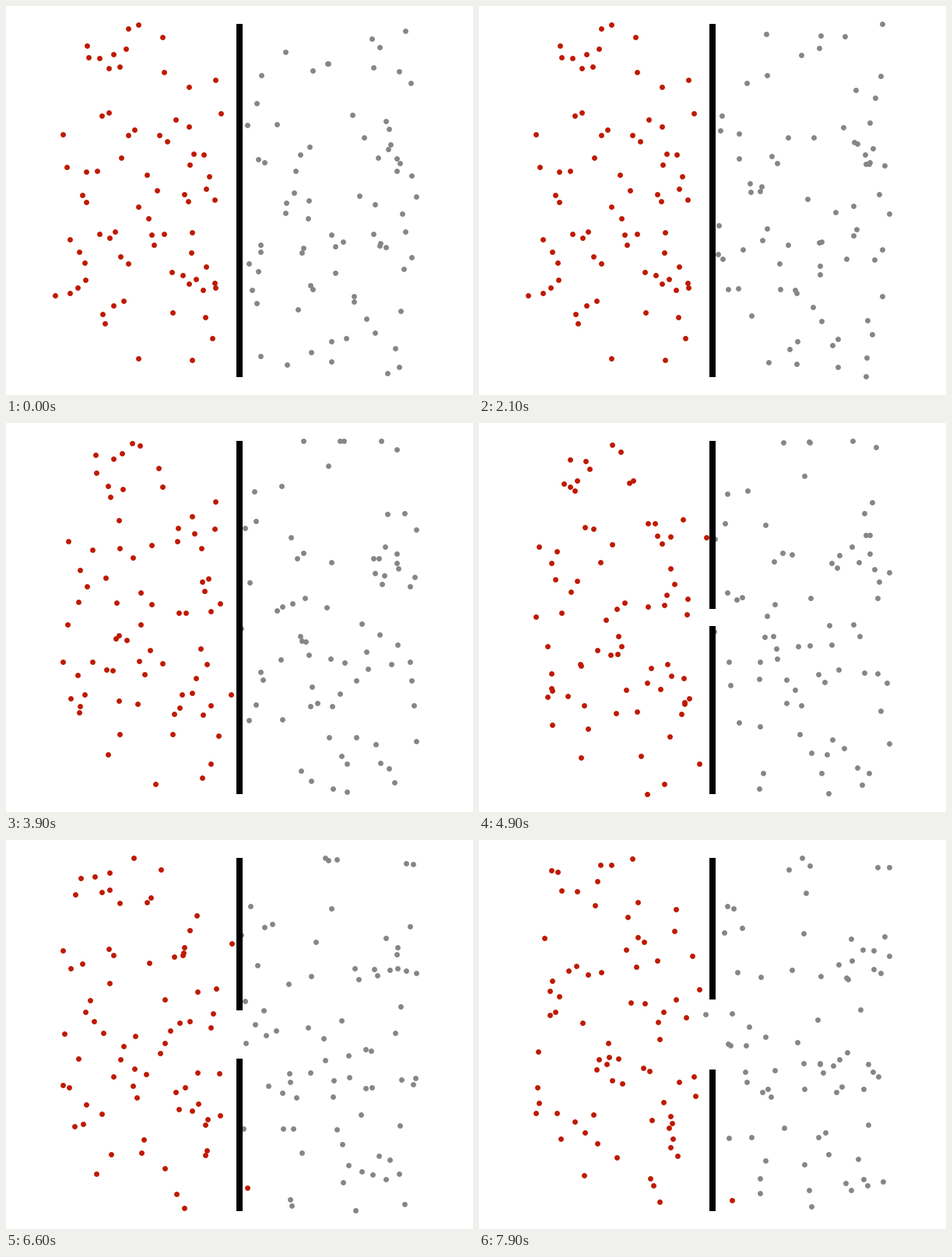
Animation, 600 px wide and 500 px high, one loop 8 s. Source, as a matplotlib script:

```python
import numpy as np
import matplotlib.pyplot as plt
from matplotlib.animation import FuncAnimation
from matplotlib.patches import Rectangle

W, H = 600, 500
FRAMES = 80
UNIT = 500 / 110            # pixels per unit of the 100 x 100 box
LOW = np.array([300, 250]) - 50 * UNIT
HIGH = np.array([300, 250]) + 50 * UNIT
STEP = 1.5 * UNIT           # largest random step along each axis
RELEASE = 30                # red dots begin to move
OPENING = 39                # the wall begins to part
RED, GRAY = "#bf1a00", "#868686"

# The first PAIRED dots each have a close neighbour.
PAIRED = 24
anchors = np.array([
    (157, 29), (120, 67), (132, 80), (218, 146), (207, 174), (165, 159),
    (236, 204), (94, 316), (190, 307), (227, 346), (235, 357), (82, 369),
    (151, 379), (257, 235), (103, 213), (140, 290), (253, 365), (138, 62),
    (98, 243), (157, 331), (127, 408), (123, 141), (234, 251), (170, 258),
    (201, 40), (104, 51), (203, 85), (235, 104), (269, 95), (276, 138),
    (73, 165), (148, 195), (254, 191), (78, 207), (181, 217), (194, 237),
    (268, 249), (120, 293), (82, 300), (187, 294), (239, 291), (238, 317),
    (257, 335), (268, 356), (102, 352), (92, 362), (214, 394), (256, 400),
    (170, 453), (239, 455)])


def half_gap(n):
    return max(0, n - OPENING) * UNIT / 4


def add_neighbours(points, rng):
    angle = rng.uniform(0, 2 * np.pi, PAIRED)
    reach = rng.uniform(8, 20, PAIRED)
    shift = np.column_stack([reach * np.cos(angle), reach * np.sin(angle)])
    return np.concatenate([points, points[:PAIRED] + shift])


def walk(start, begin, rng):
    """Random walk inside the box; the wall blocks all but its opening."""
    path = [start]
    for n in range(1, FRAMES):
        old = path[-1]
        if n < begin:
            path.append(old)
            continue
        new = np.clip(old + rng.uniform(-STEP, STEP, old.shape), LOW, HIGH)
        x, y = new.T
        limit = 290 if n <= OPENING else 297
        held = np.where(old[:, 0] < 300, np.minimum(x, limit), np.maximum(x, 302))
        new[:, 0] = np.where(np.abs(y - 250) >= half_gap(n), held, x)
        path.append(new)
    return np.array(path)


def leak():
    """One red dot that seeps through the wall near the bottom."""
    n = np.arange(FRAMES)
    x = np.interp(n, [RELEASE, OPENING, 59, 79], [265, 263, 302, 325])
    y = np.interp(n, [RELEASE, OPENING, 59, 79], [427, 438, 438, 463])
    return np.stack([x, y], axis=1)[:, None]


rng = np.random.default_rng(4)
red_start = add_neighbours(anchors, rng)
gray_start = rng.uniform((308, LOW[1]), HIGH, (75, 2))
reds = np.concatenate([walk(red_start, RELEASE, rng), leak()], axis=1)
grays = walk(gray_start, 1, rng)

fig = plt.figure(figsize=(W / 100, H / 100), dpi=100, facecolor="white")
ax = fig.add_axes([0, 0, 1, 1])
ax.set(xlim=(0, W), ylim=(H, 0))
ax.axis("off")

dot = dict(ls="", marker="o", ms=6.9 * 0.72, mew=0)
gray_dots, = ax.plot([], [], color=GRAY, zorder=1, **dot)
red_dots, = ax.plot([], [], color=RED, zorder=2, **dot)
upper, lower = (ax.add_patch(Rectangle((296, y), 8, 0, fc="black", lw=0, zorder=3))
                for y in (LOW[1], 250))


def update(n):
    red_dots.set_data(*reds[n].T)
    gray_dots.set_data(*grays[n].T)
    gap = half_gap(n)
    upper.set_height(250 - gap - LOW[1])
    lower.set_y(250 + gap)
    lower.set_height(HIGH[1] - 250 - gap)
    return gray_dots, red_dots, upper, lower


anim = FuncAnimation(fig, update, frames=FRAMES, interval=100, repeat=True)
plt.show()
```
